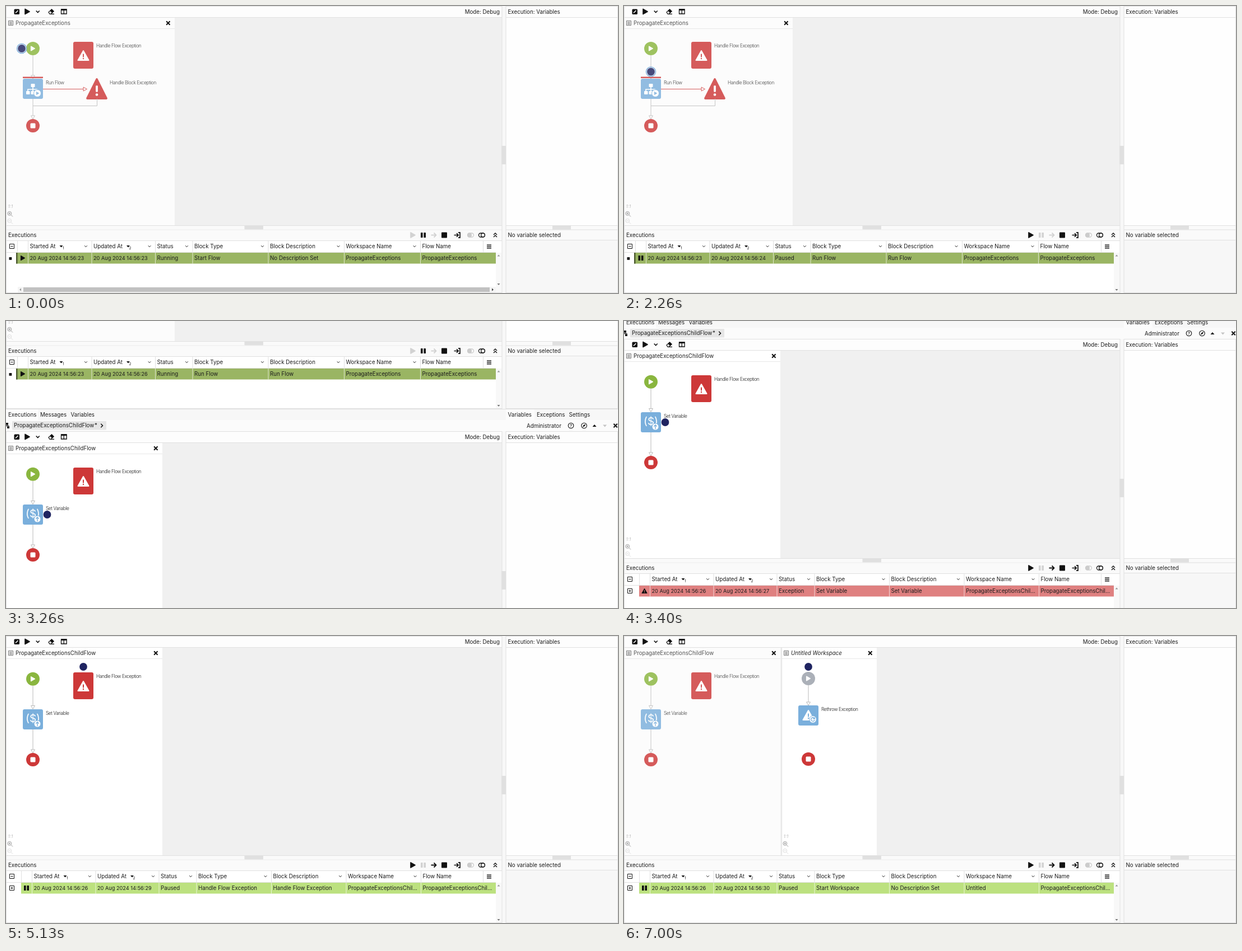
An HTML page for the animation above (8000 ms loop, 1092x513 px).

```html
<!DOCTYPE html>
<html lang="en">
<head>
<meta charset="utf-8">
<title>Flow debugger</title>
<style>
  html, body { margin: 0; width: 100%; height: 100%; overflow: hidden; background: #fff; }
  svg { display: block; width: 1092px; height: 513px; font: 9.75px Inter, sans-serif; fill: #1c1c1c; }
  text { white-space: pre; }
  .label { font-size: 8.3px; font-weight: 300; letter-spacing: -.37px; }
  .date { font-size: 9.2px; }
  .small { font-size: 6.5px; }
</style>
</head>
<body>
<svg viewBox="0 0 1092 513"><g id="scene"></g></svg>
<script>
const LOOP = 8000, PAGE = 553;
const INK = '#111', FAINT = '#d2d2d2', EDGE = '#e0e0e0', WIRE = '#b9b9b9';
const RED = '#cd3838', BLUE = '#7aafdc', GREEN = '#8ab63f', NAVY = '#1f2461';

// Drawing helpers
const rect = (x, y, w, h, fill, more = '') => `<rect x="${x}" y="${y}" width="${w}" height="${h}" fill="${fill}" ${more}/>`;
const circle = (x, y, r, fill, more = '') => `<circle cx="${x}" cy="${y}" r="${r}" fill="${fill}" ${more}/>`;
const text = (x, y, s, more = '') => `<text x="${x}" y="${y}" ${more}>${s}</text>`;
const label = (x, y, s) => text(x, y, s, 'class="label"');
const group = (x, y, body, more = '') => `<g transform="translate(${x} ${y})" ${more}>${body}</g>`;
const fillPath = (d, fill = INK) => `<path d="${d}" fill="${fill}"/>`;
const line = (d, color = INK, width = 1, more = '') =>
  `<path d="${d}" fill="none" stroke="${color}" stroke-width="${width}" ${more}/>`;
const hline = (x, y, w, color = EDGE) => rect(x, y, w, 1, color);
const vline = (x, y, h, color = EDGE) => rect(x, y, 1, h, color);

// Small icons, drawn around their centre
const play = (x, y, color = INK, s = 1) =>
  group(x, y, `<path d="M-4-4.6L4 0L-4 4.6Z" fill="${color}" stroke="${color}" stroke-width="1.6" stroke-linejoin="round" transform="scale(${s})"/>`);
const pause = (x, y, color = INK) => rect(x - 4.5, y - 4.5, 3.6, 9, color, 'rx=".6"') + rect(x + .9, y - 4.5, 3.6, 9, color, 'rx=".6"');
const cross = (x, y) => group(x, y, line('M-3.2-3.2L3.2 3.2M3.2-3.2L-3.2 3.2', INK, 2));
const chevron = (x, y, s = 2.3, w = 1) => group(x, y, line(`M${-s} ${-s / 2}L0 ${s / 2}L${s} ${-s / 2}`, INK, w));
const step = (x, y, color) => group(x, y, line('M-5 0H4M0-4L4 0L0 4', color, 1.8));
const box = (x, y, plus) => group(x, y, line(`M-4-4H4V4H-4ZM-2 0H2${plus ? 'M0-2V2' : ''}`));
const toggle = (x, y, color, side) =>
  rect(x - 5.5, y - 3.5, 11, 7, 'none', `rx="3.5" stroke="${color}" stroke-width="1.3"`) + circle(x + side * 2, y, 3.3, side > 0 ? '#fff' : color, `stroke="${color}" stroke-width="1.3"`);
const zoom = (x, y, color, plus) => group(x, y,
  circle(-.7, -.7, 3.4, 'none', `stroke="${color}"`) + line(`M2 2L5 5M-2.5-.7H1.1${plus ? 'M-.7-2.5V1.1' : ''}`, color));
const warn = (x, y, w, h, fill, mark) => {
  const k = h / 19;
  return `<path d="M${x} ${y + 1}L${x + w / 2 - 1} ${y + h - 1}H${x - w / 2 + 1}Z" fill="${fill}" stroke="${fill}" stroke-width="${2 * k}" stroke-linejoin="round"/>` +
    rect(x - k, y + 6.5 * k, 2 * k, 6 * k, mark, `rx="${k * .6}"`) + circle(x, y + 15 * k, 1.2 * k, mark);
};

// Flow diagram parts
const start = (x, y, color = GREEN) => circle(x, y, 12, color) + play(x, y, '#fff', .85);
const stop = (x, y) => circle(x, y, 12, RED) + rect(x - 4.5, y - 4.5, 9, 9, '#fff', 'rx="1.5"');
const arrow = (x, y, end) =>
  line(`M${x} ${y}V${end - 6}M${x - 3.5} ${end - 6}H${x + 3.5}L${x} ${end}Z`, WIRE);
const block = (x, y, h, color) => rect(x, y, 36, h, color, 'rx="3"');
const handler = y => block(120, y, 48, RED) + warn(138, y + 15, 21, 19, '#fff', RED) + label(161, y + 10, 'Handle Flow Exception');
const token = ([x, y], ring) => (ring ? circle(x, y, 9.2, '#5b9bd5') + circle(x, y, 7.9, '#e8eef6') : '') + circle(x, y, 6.9, NAVY);

const flowTree = () => group(48, 148,
  rect(-3.5, -9, 7, 6, '#fff', 'rx="1"') + line('M0-3V4M-9 4V1H7V4', '#fff', 1.7) +
  [-12, -3.5].map(x => rect(x, 4, 6.5, 6, '#fff', 'rx="1"')).join('') +
  circle(8, 8, 6.5, '#fff', `stroke="${BLUE}"`) + play(8.5, 8, BLUE, .55));

const variableMark = () =>
  text(48, 154, '($)', 'text-anchor="middle" fill="#fff" font-size="19"') +
  circle(56, 157, 6, '#fff', `stroke="${BLUE}"`) + group(56, 157, line('M0 4V-3M-2.7-.5L0-3.2L2.7-.5', BLUE, 1.4));

const rethrowMark = () => warn(329, 132, 21, 19, '#fff', BLUE) +
  circle(337, 149, 6.3, '#fff', `stroke="${BLUE}"`) + group(337, 149, line('M2.6-2A3.3 3.3 0 1 0 3.2 1M3.2-3.8V-1H.4', BLUE, 1.3));

function panel(x, w, title, dim, body, italic = '') {
  const right = x + w;
  return rect(x, 21, w, 371, dim ? '#fcfcfc' : '#fff') + hline(x, 40, w, '#e8e8e8') + vline(x, 21, 371) +
    group(x + 8.5, 30.5, line('M-4-4H4V4H-4ZM-2.5-1.7H2.5M-2.5 .2H2.5M-2.5 2.1H2.5', '#666', .9)) +
    text(x + 17, 34, title, `fill="${dim ? '#555' : '#222'}" ${italic}`) + cross(right - 11.7, 30.5) +
    `<g opacity="${dim ? .82 : 1}">${body}</g>` +
    text(x + 3.5, 361, '1:1', 'font-size="8" font-style="italic" fill="#bbb"') +
    zoom(x + 7, 371.5, '#999', true) + zoom(x + 7, 384.5, '#ddd', false);
}

const parentPanel = at => panel(0, 301, 'PropagateExceptions', true,
  start(48, 76) + arrow(48, 88, 130) + rect(30, 126.5, 36, 2.5, RED) +
  block(30, 130, 36, BLUE) + flowTree() + label(71, 140, 'Run Flow') +
  line('M66 148.5H138M138 145V152L144.5 148.5Z', RED) +
  warn(162, 130, 36, 36, RED, '#fff') + label(185, 140, 'Handle Block Exception') +
  line('M162.5 166V178.5H48', WIRE) + arrow(48, 166, 202) + stop(48, 214) +
  handler(64) + token(at, true));

const childPanel = (at, dim) => panel(0, 279, 'PropagateExceptionsChildFlow', dim,
  start(48, 76.7) + arrow(48, 89, 130.5) + block(30, 131, 36, BLUE) + variableMark() +
  label(71, 141, 'Set Variable') + arrow(48, 167, 209) + stop(48, 221) +
  handler(65) + (at ? token(at) : ''));

const untitledPanel = at => panel(281, 170, 'Untitled Workspace', false,
  start(329, 76, '#abb0b8') + arrow(329, 88, 124) + block(311, 124, 36, BLUE) + rethrowMark() +
  label(352, 134, 'Rethrow Exception') + stop(329, 220) + (at ? token(at) : ''), 'font-style="italic"');

// Executions table
const HEADS = ['Started At', 'Updated At', 'Status', 'Block Type', 'Block Description', 'Workspace Name', 'Flow Name'];
const PARENT_COLS = [39, 152.5, 266, 332.5, 467.5, 603, 739];
const CHILD_COLS = [46, 159.5, 272.5, 339.5, 473, 606.5, 740];

function table(cols, run) {
  const child = cols === CHILD_COLS, left = child ? 27 : 18;
  const busy = run.status === 'Running';
  const tone = child ? (run.status === 'Exception' ? '#df8080' : '#bce17f') : '#9ab563';
  let out = rect(0, 420, 885, 93, '#fff') + hline(0, 419, 885) + hline(0, 440, 874) +
    rect(left, 441, 874 - left, 19.5, tone) + box(10.5, 429.5, false) +
    (child ? box(10.5, 450.5, true) : rect(5.5, 449, 4.8, 4.8, INK) + rect(18, 441, 2.5, 19.5, '#4c5a31') + vline(20, 420, 20)) +
    (child ? vline(27, 420, 20) : '');
  const cells = ['20 Aug 2024 14:56:' + (child ? 26 : 23), '20 Aug 2024 14:56:' + run.second, run.status, run.type, run.note, run.space,
    child ? 'PropagateExceptionsChil...' : 'PropagateExceptions'];
  cols.forEach((x, i) => {
    out += vline(x, 420, 20) + vline(x, 441, 19.5, '#ffffffb0') +
      text(x + 3.5, 433, HEADS[i]) + text(x + 3.5, 453.8, cells[i], i < 2 ? 'class="date"' : '');
    if (i < 6) out += chevron(cols[i + 1] - 10, 429.5);
    if (i < 2) out += fillPath(`M${x + 56.5 + i * 6} 428h6l-3 3.5Z`) + text(x + 62 + i * 5, 435, i + 1, 'class="small"');
  });
  const mark = left + (child ? 9.5 : 12);
  out += run.status === 'Exception' ? warn(mark, 445.5, 11, 10, INK, tone) : busy ? play(mark, 450.5, INK, .85) : pause(mark, 450.5);
  out += vline(851, 420, 20) + [426.5, 429.3, 432.1].map(y => rect(858, y, 8, 1.4, INK)).join('');
  const low = run.hbar ? 497 : 507;
  out += rect(874, 441, 10.5, 71, '#f8f8f8') + fillPath('M876.5 447.5h5l-2.5-3Z', '#999') + fillPath(`M876.5 ${low - 1}h5l-2.5 3Z`, '#777');
  if (run.hbar) out += rect(21, 502, 853, 10, '#f4f4f4') + rect(31, 503, 832, 8, '#c1c1c1') +
    fillPath('M27 504.5v5l-3-2.5Z', '#999') + fillPath('M867 504.5v5l3-2.5Z', '#444');
  return out + hline(0, 512, 885);
}

function controls(run) {
  const busy = run.status === 'Running';
  return text(4, 413, 'Executions') + play(726, 409.5, busy ? FAINT : INK) + pause(744.5, 409.5, busy ? INK : FAINT) +
    step(763.5, 409.5, run.step ? INK : FAINT) + rect(777, 404.5, 10, 10, INK, 'rx="1"') +
    group(805, 409.5, line('M-5.5 0H2M-1-3.2L2.2 0L-1 3.2M2-4.6H5V4.6H2', INK, 1.7)) +
    toggle(829, 409.5, '#ccc', -1) + toggle(849, 409.5, INK, 1) +
    group(873, 409.5, line('M-3-.5L0-3.5L3-.5M-3 3.5L0 .5L3 3.5', INK, 1.4));
}

const toolbar = () => rect(0, 0, 1092, 20, '#fdfdfd') + hline(0, 0, 1092) +
  rect(14.5, 5.5, 9.5, 9.5, INK, 'rx="1.5"') + line('M17 12.5L21.5 8', '#fff', 1.5) +
  play(38, 10) + chevron(56.7, 10, 3, 1.6) +
  group(80.5, 10, line('M-4.6 1.2L1-4.2L4.7-.6L-.6 4.4H-2.4ZM-1 4.4H5.5', INK, 1.2) + fillPath('M-2-1.2L1-4.2L4.7-.6L1.6 2.5Z')) +
  group(103.3, 10, line('M-4.8-4H4.8V4H-4.8ZM0-4V4', INK, 1.3) + rect(-5, -4.6, 10, 2.6, INK)) +
  text(881, 14, 'Mode: Debug', 'text-anchor="end"');

function page(y, panels, cols, run) {
  return group(0, y,
    rect(0, 0, 1092, 513, '#fafafa') + toolbar() + rect(0, 21, 885, 371, '#f0f0f0') + hline(0, 20, 885) + panels +
    hline(0, 392, 885) + rect(425.5, 393, 33.5, 6.5, '#e0e0e0') + hline(0, 399.5, 885, '#eee') +
    controls(run) + table(cols, run) + vline(0, 0, 513) +
    rect(885, 0, 7, 513, '#f8f8f8') + vline(884.5, 0, 513) + rect(884, 250, 8, 33, '#e0e0e0') +
    rect(892, 21, 199, 371, '#fefefe') + hline(892, 20, 200) + hline(892, 392, 200) + text(895.5, 14, 'Execution: Variables') +
    rect(975, 393, 33, 6.5, '#e0e0e0') + hline(892, 399.5, 200) + text(895.5, 413, 'No variable selected') +
    hline(892, 418, 200) + rect(892, 419, 200, 94, '#f7f7f7') + hline(892, 512, 200) + vline(891.5, 0, 513) + vline(1091, 0, 513));
}

// Tabs and title bar between the two pages
const divider = () => group(0, 513,
  rect(0, 0, 1092, 40, '#f7f7f7') + hline(0, 0, 1092) + rect(0, 1, 57, 19, '#fcfcfc') + rect(892, 1, 51, 19, '#fcfcfc') +
  [[4, 'Executions'], [61, 'Messages'], [115.5, 'Variables'], [895.5, 'Variables'], [947, 'Exceptions'], [1004.5, 'Settings']]
    .map(([x, s]) => text(x, 14, s)).join('') +
  rect(0, 20, 1092, 20, '#fbfbfb') + group(2, 30, rect(-2, -5, 4, 3.5, INK) + line('M0-2V2M-4 2V0H3V2', INK) + rect(0, 1.5, 4, 3.5, INK)) +
  rect(11, 22, 168, 15.5, '#e6e6e6', 'rx="1"') + text(14, 33, 'PropagateExceptionsChildFlow') + text(158, 33, '*') +
  group(171, 30, line('M-1.7-3.2L1.5 0L-1.7 3.2', INK, 1.5)) + text(929, 33.5, 'Administrator') +
  circle(1008, 30, 4.8, 'none', `stroke="${INK}" stroke-width="1.1"`) + text(1008, 32.7, '?', 'text-anchor="middle" font-size="7.5" font-weight="600"') +
  circle(1031.5, 30, 4.8, 'none', `stroke="${INK}" stroke-width="1.1"`) + fillPath('M1034.3 27.2L1032.5 31L1028.7 32.8L1030.5 29Z') +
  fillPath('M1046.5 32h7l-3.5-4Z') + fillPath('M1065 28.5h7l-3.5 4Z', '#c4c4c4') + cross(1087.5, 30));

// State at a given time
function parentRun(t) {
  const base = { space: 'PropagateExceptions', hbar: t < 200, step: t >= 60 && t < 2260 };
  if (t < 60) return { ...base, at: [28, 76], second: 23, status: 'Running', type: 'Start Flow', note: 'No Description Set' };
  const flow = { ...base, type: 'Run Flow', note: 'Run Flow' };
  return t < 2400 ? { ...flow, at: [48, 117.5], second: 24, status: 'Paused' } : { ...flow, at: [22, 148], second: 26, status: 'Running' };
}

function childRun(t) {
  const base = { space: 'PropagateExceptionsChil...', step: t < 4460 || (t >= 5130 && t < 6260) || t >= 7000 };
  if (t < 5130) return { ...base, at: [73.5, 149], second: 27, status: 'Exception', type: 'Set Variable', note: 'Set Variable' };
  const handle = { ...base, type: 'Handle Flow Exception', note: 'Handle Flow Exception' };
  if (t < 6330) return { ...handle, at: [138, 55], second: 29, status: 'Paused' };
  if (t < 6730) return { ...handle, at: [112, 89], second: 30, status: 'Running' };
  const paused = t >= 7000;
  return { ...base, at: paused ? [329, 55] : [309, 76], second: 30, status: paused ? 'Paused' : 'Running',
    type: 'Start Workspace', note: 'No Description Set', space: 'Untitled', nested: true };
}

// The CSS "ease" curve, cubic-bezier(.25, .1, .25, 1)
function ease(x) {
  if (x <= 0 || x >= 1) return x <= 0 ? 0 : 1;
  const bezier = (a, b, s) => 3 * a * s * (1 - s) ** 2 + 3 * b * s * s * (1 - s) + s ** 3;
  let low = 0, high = 1;
  for (let i = 0; i < 20; i++) {
    const mid = (low + high) / 2;
    if (bezier(.25, .25, mid) < x) low = mid; else high = mid;
  }
  return bezier(.1, 1, low);
}

// The scroll advances at 15 steps a second
function scrollAt(t) {
  const tick = Math.floor((t + 8) * 15 / 1000) * 1000 / 15;
  return Math.round(PAGE * ease((tick - 3115) / 405));
}

const scene = document.getElementById('scene');
let shown = '';
function draw() {
  const t = performance.now() % LOOP;
  const parent = parentRun(t), child = childRun(t), scroll = scrollAt(t);
  const key = JSON.stringify([parent, child]);
  if (key !== shown) {
    shown = key;
    scene.innerHTML = page(0, parentPanel(parent.at), PARENT_COLS, parent) + divider() +
      page(PAGE, childPanel(child.nested ? null : child.at, child.nested) + (child.nested ? untitledPanel(child.at) : ''), CHILD_COLS, child);
  }
  scene.setAttribute('transform', `translate(0 ${-scroll})`);
  requestAnimationFrame(draw);
}
draw();
</script>
</body>
</html>
```
